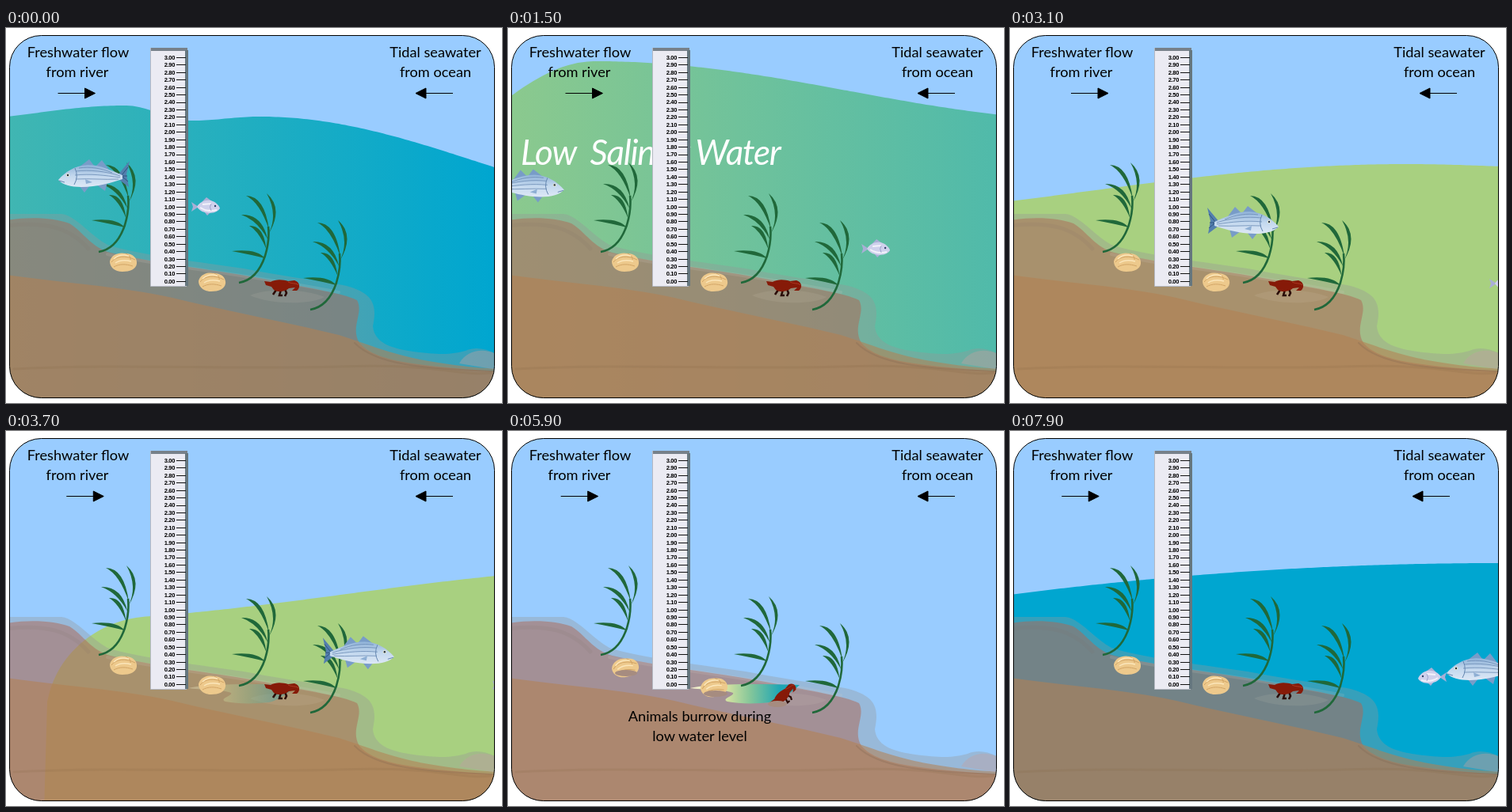
Animation, 626 px wide and 474 px high, one loop 8000 ms. Source, as an HTML page:

```html
<!DOCTYPE html>
<html lang="en">
<head>
<meta charset="utf-8">
<title>Estuary tides</title>
<style>
html, body { margin: 0; width: 100%; height: 100%; overflow: hidden; background: #fff; }
svg { display: block; width: 100%; height: 100%; }
text { font-family: Lato, "Open Sans", sans-serif; }
.label { font-size: 18.2px; text-anchor: middle; }
.num { font: bold 7.6px "Liberation Sans", Arial, sans-serif; text-anchor: end; letter-spacing: -.4px; }
</style>
</head>
<body>
<svg viewBox="0 0 626 474">
  <defs>
    <clipPath id="stage"><rect x="4.5" y="9.5" width="612" height="458" rx="40"/></clipPath>
    <linearGradient id="tide" gradientUnits="userSpaceOnUse" x1="4" x2="616" y1="0" y2="0">
      <stop id="tideL"/><stop id="tideR" offset="1"/>
    </linearGradient>
    <linearGradient id="poolFill">
      <stop stop-color="#f7f2d2"/><stop offset=".35" stop-color="#cfe0a0"/>
      <stop offset=".55" stop-color="#84c69a"/><stop offset=".82" stop-color="#1ea6b4"/>
    </linearGradient>
    <linearGradient id="scales" x2="0" y2="1">
      <stop stop-color="#8fb2d8"/><stop offset=".5" stop-color="#c3d8ee"/><stop offset="1" stop-color="#dde8f6"/>
    </linearGradient>
    <g id="clam">
      <path d="M-17-1C-15-10-5-13 3-11C12-11 18-5 17 2C16 9 8 12-1 12C-11 12-17 6-17-1Z" fill="#edc98c"/>
      <path d="M-15 0C-9-8 3-9 15-3M-12 6C-5 2 3 2 12 5M3-11C7-9 10-6 9-3" fill="none" stroke="#d2a566"/>
      <path d="M-12-4C-7-9 0-10 7-8M-10 1C-4-3 3-3 10-1" fill="none" stroke="#fbe6ba" stroke-width="1.5"/>
    </g>
    <g id="plant" fill="#20683a">
      <path d="M117 283Q140 279 150 249Q156 229 154 212" fill="none" stroke="#20683a" stroke-width="2.6"/>
      <path d="M154 222Q174 189 152 170Q167 197 154 222Z"/>
    </g>
  </defs>

  <g clip-path="url(#stage)">
    <rect width="626" height="474" fill="#9cf"/>
    <path id="water" fill="url(#tide)"/>

    <path fill="rgb(150,150,150)" fill-opacity=".36" d="M0 235H70C88 237 106 262 128 274C160 285 230 294 300 304C350 314 400 320 430 326C466 336 468 352 463 377C465 398 486 405 514 409C550 414 566 412 580 408C594 402 606 406 620 412V474H0Z"/>
    <path fill="rgb(175,105,85)" fill-opacity=".5" d="M0 243C30 238 62 240 80 247C98 258 108 278 132 284C190 298 260 305 330 318C380 328 425 335 443 344C452 360 434 378 446 398C466 422 520 427 620 434V474H0Z"/>
    <path fill="rgb(180,128,80)" fill-opacity=".55" d="M0 312C60 321 140 326 210 341C280 358 350 371 420 388C470 403 500 423 620 431V474H0Z"/>
    <path fill="#c0a0a0" fill-opacity=".4" d="M572 424C582 406 604 404 620 413V432Z"/>
    <g fill="none" stroke-linecap="round">
      <path d="M128 286C200 302 300 310 420 334" stroke="#d8c8c0" stroke-opacity=".15" stroke-width="4"/>
      <path d="M0 250C50 244 80 252 104 279" stroke="#7c6c62" stroke-opacity=".12" stroke-width="5"/>
      <path d="M10 431C150 424 280 432 420 428S560 440 612 436" stroke="#7a5a3c" stroke-opacity=".14" stroke-width="3"/>
      <path d="M440 398C466 425 520 430 616 434" stroke="#78624e" stroke-opacity=".25" stroke-width="2"/>
    </g>
    <path d="M308 338C330 328 380 330 402 340C384 350 335 350 308 338Z" fill="#e0d8c0" fill-opacity=".1"/>
    <path id="pool" fill="url(#poolFill)" d="M230 325C250 320 300 319 368 321C356 332 344 340 332 343C312 345 292 345 277 342C268 338 286 335 284 331C272 326 250 328 230 325Z"/>

    <g id="plants"></g>
    <g id="clams"></g>
    <g id="cray">
      <path d="M-7 5L-11 11M-1 5L-3 12L1 12M4 4L6 9L4 13" fill="none" stroke="#2a0c06" stroke-width="2.6"/>
      <path d="M-22-6L-14-5C-8-9 2-8 8-6L16-7C23-5 24 2 19 6L13 6L17 2L9 3C4 8-6 8-10 5L-13 1L-20-1Z" fill="#861a08"/>
      <path d="M8-5C14-2 19-4 21-1" fill="none" stroke="#b5432a" stroke-width=".8"/>
    </g>
    <g id="silt" fill="#a68c80"><ellipse cx="149" cy="306" rx="14" ry="4"/><ellipse cx="262" cy="332" rx="15" ry="4"/><ellipse cx="340" cy="345" rx="12" ry="4"/></g>

    <text id="banner" y="173" font-size="44" font-style="italic" letter-spacing="-1.2" fill="#fff">Low&nbsp; Salinity Water</text>

    <g id="ruler">
      <path d="M182 25H229V326H182Z" fill="#ebebf3"/>
      <path d="M182 25H229V29H182Z" fill="#77818a"/>
      <path d="M226 28H230V326H226Z" fill="#66777f"/>
      <path d="M182.5 25V326.5H228" fill="none" stroke="#b4b8c2"/>
    </g>

    <g id="smallFish">
      <path d="M-9 0L-18-6L-16 0L-18 6ZM-5-6L1-12L8-7ZM-2 6L2 11L7 6Z" fill="#a9afd6"/>
      <path d="M-11 0C-7-7 2-10 9-7C14-5 17-1 18 2C14 8 5 9-1 7C-6 6-9 3-11 0Z" fill="#cfd1ec"/>
      <path d="M-7 1C-1 5 6 6 14 4M-4-3L7-4" fill="none" stroke="#f3f2fb" stroke-width="2"/>
      <path d="M7-4Q4 0 7 5" fill="none" stroke="#9098c4" stroke-width=".8"/>
      <circle cx="12" cy="-1" r="1.2" fill="#33406a"/>
    </g>
    <g id="bigFish">
      <path d="M-31 0L-46-18L-42-1L-45 15L-33 6Z" fill="#537fae"/>
      <path d="M-36 0L-44-10M-37 2L-44 8M-36 1L-43 1" stroke="#2f527f"/>
      <path d="M-20-7L-11-19L-3-11ZM-1-12L5-20L18-10ZM-18 9L-15 20L-4 12ZM4 13L11 22L18 13Z" fill="#789cc8"/>
      <path d="M-37 0C-25-5-10-13 7-13C24-12 35-4 44 6C39 12 28 15 15 15C-5 15-25 9-37 5Z" fill="url(#scales)"/>
      <path d="M-34 1C-16-5 4-7 22-5M-34 3C-14 0 4-2 23 0M-32 5C-14 6 4 4 22 5M-24-3C-10-9 4-11 18-9" fill="none" stroke="#6a8bb4" stroke-width=".8"/>
      <path d="M23-9Q18 2 24 12M36 9L43 7" fill="none" stroke="#6486b0"/>
      <path d="M10 5L1 9L9 11Z" fill="#8eafd4"/>
      <circle cx="32" cy="0" r="2" fill="#f3edc4"/><circle cx="32" cy="0" r="1.2" fill="#1c2c48"/>
    </g>

    <g class="label">
      <text x="91" y="37">Freshwater flow</text><text x="90" y="62">from river</text>
      <text x="542" y="37">Tidal seawater</text><text x="542" y="62">from ocean</text>
      <g id="caption"><text x="242" y="367">Animals burrow during</text><text x="242" y="392">low water level</text></g>
    </g>
    <path id="riverArrow" d="M0 82.5H36M34 76L47 82.5L34 89Z" stroke="#000"/>
    <path id="oceanArrow" d="M47 82.5H11M13 76L0 82.5L13 89Z" stroke="#000"/>
  </g>
  <rect x="4.5" y="9.5" width="612" height="458" rx="40" fill="none" stroke="#000"/>
</svg>

<script>
const LOOP = 8000, STEP = 200, EBB_END = 5500;
const FLOW = .55;    // wave speed, px per ms
const REACH = 126;   // width of the rounded water edge
const $ = id => document.getElementById(id);
const mix = (a, b, k) => a + (b - a) * k;
const clamp = (v, lo = 0, hi = 1) => Math.max(lo, Math.min(hi, v));
const ramp = (t, from, to) => clamp((t - from) / (to - from));
const swell = k => (1 - Math.cos(Math.PI * k)) / 2;

function add(parent, tag, attrs, text = "") {
  const el = document.createElementNS("http://www.w3.org/2000/svg", tag);
  for (const name in attrs) el.setAttribute(name, attrs[name]);
  el.textContent = text;
  return parent.appendChild(el);
}

// Segment of a list of [position, ...values] around p, and the progress in it
function span(list, p) {
  let i = 0;
  while (i < list.length - 2 && p >= list[i + 1][0]) i++;
  const [a, b] = [list[i], list[i + 1]];
  return [a, b, ramp(p, a[0], b[0])];
}

// Crests and troughs [x, y] of one wave train that drifts to the right
const train = [[-2005, 240], [-1205, 172], [-990, 177], [-715, 42], [-75, 117],
  [150, 98], [235, 117], [320, 112], [860, 223]];

// Drop of the surface near the rounded edge of the water
function bank(x, edge) {
  if (x < edge) return 500;
  const d = clamp(1 - (x - edge) / REACH);
  return 124 * (1 - Math.sqrt(1 - d * d));
}
function ebb(x, t) {
  const [a, b, k] = span(train, x - FLOW * t);
  return mix(a[1], b[1], swell(k)) + bank(x, FLOW * t - 1985);
}
function flood(x, t) {
  const k = ramp(t, 6100, 7900);
  return 167 + 40 * (1 - x / 616) ** 2 + 110 * (1 - k) + bank(x, mix(630, -REACH, k));
}
function waterPath(t) {
  const level = t < EBB_END ? ebb : flood;
  let d = "M0 480";
  for (let x = 0; x <= 624; x += 4) d += `L${x} ${Math.min(480, level(x, t)).toFixed(1)}`;
  return d + "V480Z";
}
const salt = [0, 166, 208], fresh = [168, 208, 128];
const tint = k => `rgb(${salt.map((v, i) => Math.round(mix(v, fresh[i], clamp(k))))})`;

// Fish paths: [time, x, y]
const bigSwim = [[0, 110, 186], [1100, -60, 188], [2100, 157, 214], [3100, 295, 245],
  [4500, 647, 325], [6900, 740, 302], [7900, 595, 300]];
const smallSwim = [[0, 252, 226], [700, 383, 275], [2100, 525, 282], [3100, 623, 323],
  [6900, 680, 312], [7900, 533, 311]];

[[126, 173], [120, 197], [130, 211], [108, 243]].forEach(([tx, ty], i) => {
  const x = 155 - i * 1.8, y = 216 + i * 12;
  const cx = mix(tx, x, .7), cy = mix(ty, y, .1);
  add($("plant"), "path", { d: `M${x} ${y}Q${cx + 3} ${cy - 4} ${tx} ${ty}Q${cx - 3} ${cy + 4} ${x} ${y}Z` });
});
for (const [x, y] of [[0, 0], [177, 39], [267, 73]])
  add($("plants"), "use", { href: "#plant", x, y });

const clams = [[148, 296], [260, 321]].map(([x, y]) => [add($("clams"), "use", { href: "#clam" }), x, y]);

for (let i = 0; i <= 30; i++) {
  const y = 37.5 + i * 9.43;
  add($("ruler"), "text", { class: "num", x: 213, y: y + 2.4 }, ((30 - i) / 10).toFixed(2));
  add($("ruler"), "path", { d: `M215 ${Math.floor(y) + .5}H227`, stroke: "#111" });
}

const move = (id, x, y, extra = "") => $(id).setAttribute("transform", `translate(${x} ${y})${extra}`);
function swim(id, path, t, left) {
  const [a, b, k] = span(path, t);
  move(id, mix(a[1], b[1], k), mix(a[2], b[2], k), left ? " scale(-1 1)" : "");
}

function draw(t) {
  const rising = t >= EBB_END;
  $("water").setAttribute("d", waterPath(t));
  $("tideL").setAttribute("stop-color", tint(rising ? 0 : .38 + t * .0003));
  $("tideR").setAttribute("stop-color", tint(rising ? 0 : t * .00033 - .02));

  swim("bigFish", bigSwim, t, t < 1100 || rising);
  swim("smallFish", smallSwim, t, rising);

  move("riverArrow", 70.5 + 6.5 * Math.sin((t - 1100) / LOOP * 2 * Math.PI), 0);
  move("oceanArrow", 517 - 9 * ramp(t, 5900, 7900), 0);

  const dug = ramp(t, 4500, 5500) - ramp(t, 6500, 7100);
  for (const [el, x, y] of clams)
    el.setAttribute("transform", `translate(${x} ${y + dug * 3}) rotate(${-8 * dug})`);
  move("cray", 348, 326 + dug * 8, ` rotate(${-42 * dug}) scale(${1 - dug * .15})`);
  $("silt").setAttribute("opacity", dug);
  $("pool").setAttribute("opacity", ramp(t, 3500, 4100) - ramp(t, 6500, 7100));

  $("banner").setAttribute("x", 286 + (t - 2100) * .45);
  $("caption").setAttribute("opacity", t >= 4900 && t < 7000 ? 1 : 0);
}

function tick(now) {
  const ms = now % LOOP;
  draw(Math.max(0, Math.floor((ms + 100) / STEP) * STEP - 100));
  requestAnimationFrame(tick);
}
draw(0);
requestAnimationFrame(tick);
</script>
</body>
</html>
```
